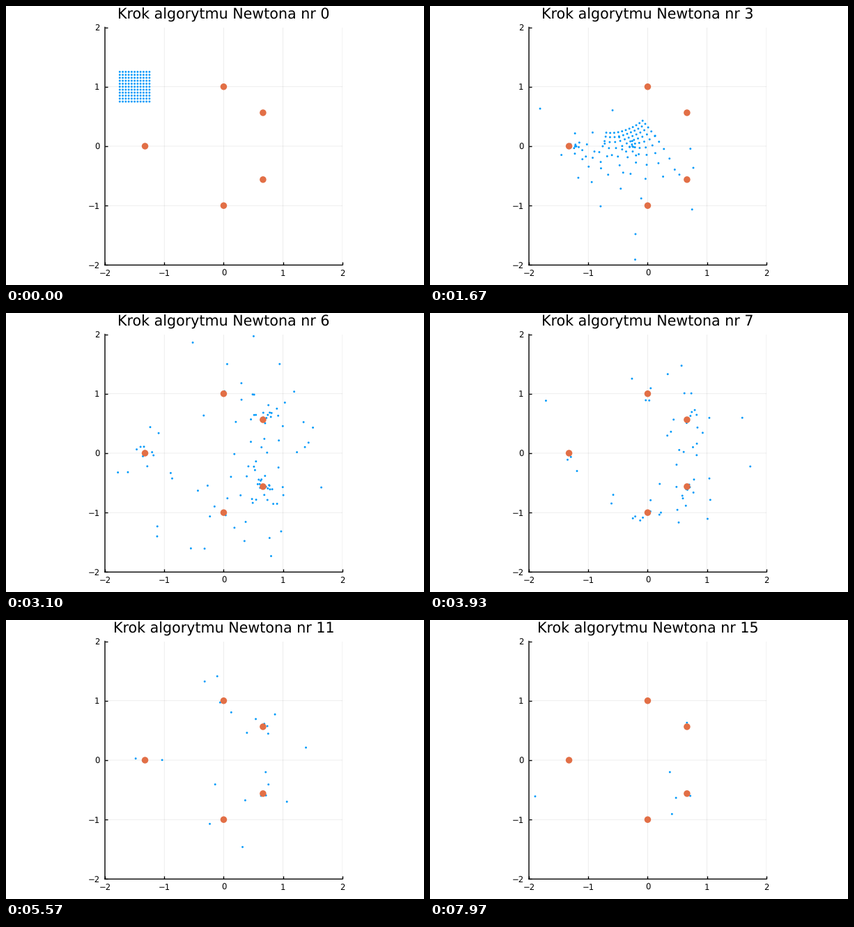
A matplotlib script that plays this animation: 600 by 400 pixels, repeating every 8000 ms.

```python
import numpy as np
import matplotlib.pyplot as plt
from matplotlib.animation import FuncAnimation

W, H, DPI = 600, 400, 100
TICK, DURATION = 20, 8000  # ms
PER_STEP, STEPS = 15, 16
PX = 72 / DPI  # one pixel in points

BLUE, ORANGE = "#009AFA", "#E26F46"

# p(z) = z^5 + z^2 - z + 1
POLY = np.array([1, 0, 0, 1, -1, 1])
DERIV = np.polyder(POLY)


def newton(z):
    return z - np.polyval(POLY, z) / np.polyval(DERIV, z)


def orbit(z, count):
    states = [z]
    for _ in range(count):
        states.append(newton(states[-1]))
    return states


def points(z):
    return np.column_stack([z.real, z.imag])


def discs(z, diameter, color, zorder):
    # one size per disc keeps their places free of pixel rounding
    sizes = np.full(z.size, (diameter * PX) ** 2)
    return ax.scatter(z.real, z.imag, s=sizes, color=color, linewidths=0,
                      zorder=zorder)


plt.rcParams.update({"font.family": "DejaVu Sans", "text.hinting": "none"})
fig = plt.figure(figsize=(W / DPI, H / DPI), dpi=DPI, facecolor="white")

left, right, top, bottom = 142, 482.9, 30.5, 371.4
ax = fig.add_axes([left / W, 1 - bottom / H, (right - left) / W, (bottom - top) / H])
ticks = range(-2, 3)
labels = [str(t).replace("-", "\u2212") for t in ticks]
ax.set_xticks(ticks, labels)
ax.set_yticks(ticks, labels)
ax.tick_params(direction="in", length=4 * PX, width=1, labelsize=8.4)
ax.tick_params(axis="x", pad=6.8 * PX)
ax.tick_params(axis="y", pad=7.5 * PX)
ax.grid(color="black", alpha=0.1, linewidth=0.5, snap=False)
ax.set_axisbelow(True)
for side, spine in ax.spines.items():
    spine.set(linewidth=1, snap=False, visible=side in ("left", "bottom"))

title = fig.text((left + right) / 2 / W, 1 - 19 / H, "", fontsize=14.9,
                 ha="center", va="baseline")

re, im = np.meshgrid(np.arange(-35, -24) / 20, np.arange(15, 26) / 20)
states = orbit((re + 1j * im).ravel(), STEPS)
dots = discs(states[0], 2.9, BLUE, 3)
discs(np.roots(POLY), 9.5, ORANGE, 4)
ax.set(xlim=(-2, 2), ylim=(-2, 2))


def draw(tick):
    # 30 pictures a second on a 20 ms clock: three for every five ticks
    step, k = divmod((3 * tick + 2) // 5, PER_STEP)
    ease = (1 - np.cos(np.pi * k / (PER_STEP - 1))) / 2
    z = states[step] + ease * (states[step + 1] - states[step])
    dots.set_offsets(points(z))
    title.set_text(f"Krok algorytmu Newtona nr {step}")
    return dots, title


anim = FuncAnimation(fig, draw, frames=DURATION // TICK, interval=TICK,
                     repeat=True, repeat_delay=0)
plt.show()
```
